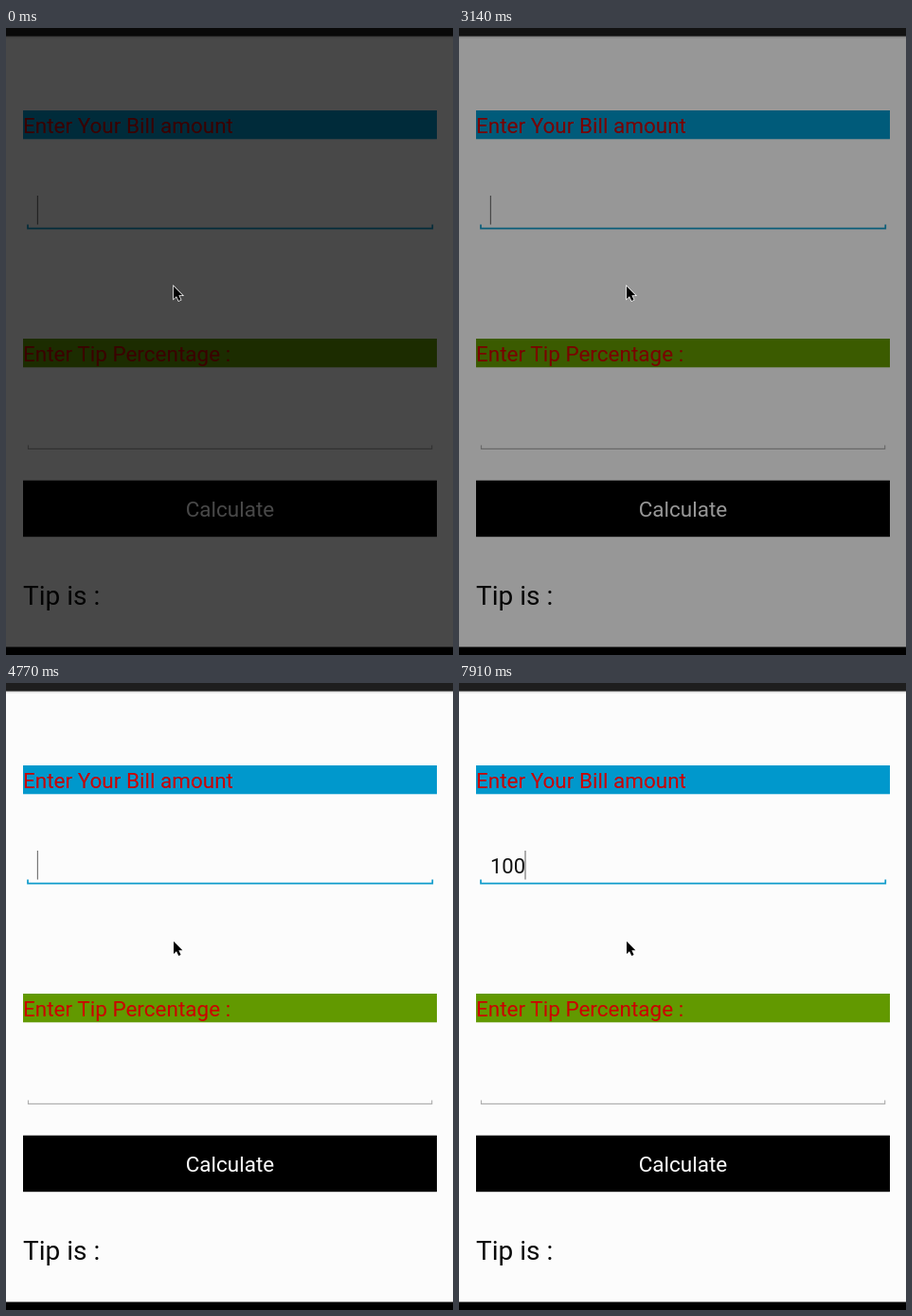
An HTML page for the animation above (8 s loop, 472 by 662 pixels).

```html
<!DOCTYPE html>
<html lang="en">
<head>
<meta charset="utf-8">
<title>Tip calculator</title>
<style>
  html, body { margin: 0; width: 100%; height: 100%; overflow: hidden; background: #000; }
  svg { display: block; width: 472px; height: 662px; }
  text { font: 22.5px Roboto, sans-serif; white-space: pre; }
  .label { fill: #c00; }
</style>
</head>
<body>
<svg viewBox="0 0 472 662">
  <rect width="472" height="662" fill="#000"/>
  <rect width="472" height="9" fill="#1e1e1e"/>
  <rect y="9" width="472" height="644.5" fill="#fcfcfc"/>
  <rect y="8.6" width="472" height="1" fill="#b4b4b4"/>
  <rect y="9.6" width="472" height="1.4" fill="#eee"/>

  <rect x="18" y="87" width="437" height="30.3" fill="#0098cc"/>
  <text class="label" x="18" y="111">Enter Your Bill amount</text>
  <path d="M23 207.5V211.7H450.3V207.5" fill="none" stroke="#0f9bcb" stroke-width="1.7"/>
  <text id="amount" x="33" y="201" style="font-size:22px" fill="#111"></text>
  <rect id="caret" y="177" width="1.2" height="30.5" fill="#777"/>

  <rect x="18" y="328" width="437" height="30.3" fill="#629900"/>
  <text class="label" x="18" y="352">Enter Tip Percentage :</text>
  <path d="M23.5 440.5V444.3H449.7V440.5" fill="none" stroke="#b0b0b0" stroke-width="1.2"/>

  <rect x="18" y="477.7" width="437" height="59.5" fill="#000"/>
  <text x="236.5" y="516" text-anchor="middle" fill="#fcfcfc">Calculate</text>
  <text x="18" y="609" style="font-size:28px" fill="#0a0a0a">Tip is :</text>

  <rect id="dim" width="472" height="662" fill="#000"/>
  <path d="M177 272.8V286L180 283.2L182.3 288L184.6 287L182.4 282.2H186.4Z"
        fill="#000" stroke="#fff" stroke-width="1.4" paint-order="stroke"/>
</svg>
<script>
  const LOOP = 8000;
  const DIGIT_WIDTH = 12.2;
  const caretToggles = [300, 740, 1340, 1790, 2240, 2840, 3580, 3730, 4320,
                        4770, 5220, 5820, 6270, 6720, 7310, 7460];
  const dimSteps = [[3140, 0.405], [3290, 0.107], [3430, 0]];
  const keyPresses = [[7460, "1"], [7610, "10"], [7910, "100"]];

  const [amount, caret, dim] = ["amount", "caret", "dim"].map(id => document.getElementById(id));

  // Value of the latest step reached at time t.
  const valueAt = (steps, t, initial) =>
    steps.reduce((value, [time, next]) => t >= time ? next : value, initial);

  function draw(t) {
    const typed = valueAt(keyPresses, t, "");
    const toggles = caretToggles.filter(time => t >= time).length;
    amount.textContent = typed;
    caret.setAttribute("x", 32.8 + DIGIT_WIDTH * typed.length);
    caret.setAttribute("opacity", toggles % 2 ? 0 : 1);
    dim.setAttribute("opacity", valueAt(dimSteps, t, 0.715));
  }

  const start = performance.now();
  function tick() {
    draw((performance.now() - start) % LOOP);
    requestAnimationFrame(tick);
  }
  tick();
</script>
</body>
</html>
```
